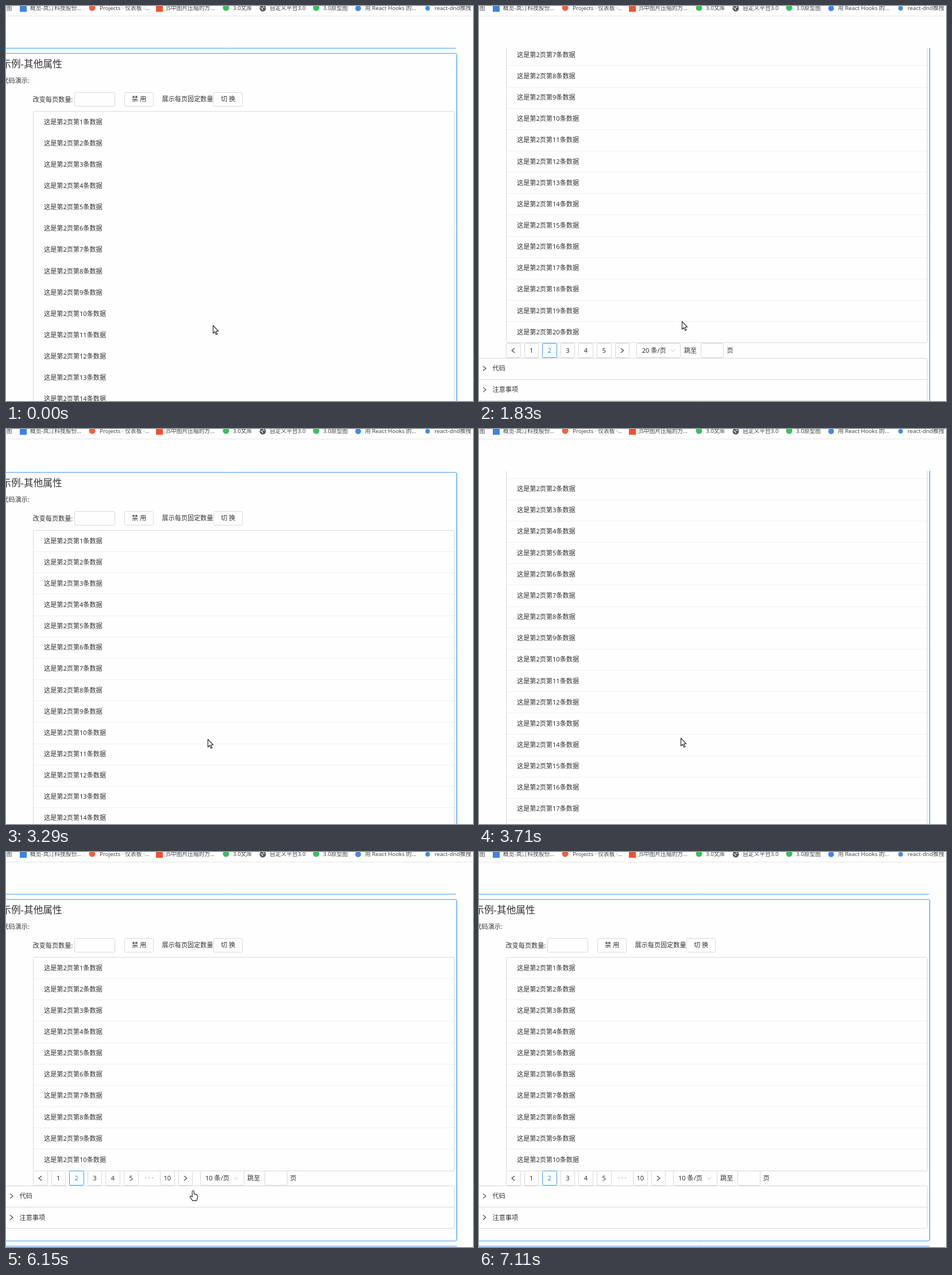
Animation of 813x688 px, one loop 7.85 s. Source, as an HTML page with a canvas:

```html
<!DOCTYPE html>
<html lang="zh-CN">
<head>
<meta charset="utf-8">
<title>分页示例</title>
<style>
html, body { margin: 0; width: 100%; height: 100%; overflow: hidden; background: #fefefe; }
canvas { display: block; width: 813px; height: 688px; }
</style>
</head>
<body>
<canvas id="stage" width="813" height="688"></canvas>
<script>
const W = 813, H = 688, LOOP = 7850;
const ROW = 37.15, TOP = 73;
const BLUE = '#409eff', INK = '#333', LINE = '#d9d9d9', RULE = '#efefef';
const FONT = '"Noto Sans", "Noto Sans CJK SC", "Noto Sans CJK", sans-serif';
const ctx = document.getElementById('stage').getContext('2d');

const ticks = [0, 120, 240, 360, 510, 660, 780, 930, 1050, 1170, 1290, 1410, 1710, 1830, 1950,
  2350, 2470, 2620, 2740, 2890, 3020, 3170, 3290, 3410, 3560, 3710, 3860, 3980, 4130, 4250,
  4400, 4520, 4640, 4760, 4910, 5060, 5190, 5340, 5460, 5610, 5750, 6030, 6150, 6300, 6450,
  6570, 6720, 6840, 6990, 7110];

// [time, scroll offset]
const scrollKeys = [[0, 0], [120, 45], [360, 185.8], [510, 185.8], [660, 197], [780, 227],
  [930, 262], [1410, 278.6], [1600, 278.6], [1950, 371.5], [2230, 371.5], [2470, 230],
  [2740, 121], [3020, 46], [3170, 14], [3410, 0], [3560, 46], [3710, 134.5], [3980, 225],
  [4250, 330], [4400, 371.5], [5749, 371.5], [5750, 0], [6150, 0], [6570, -92.9],
  [6720, -92.9], [7110, 0]];

// [time, x, y]
const cursorKeys = [[0, 360, 556], [360, 355, 550], [510, 353, 549], [2230, 353, 549],
  [2470, 351, 540], [3410, 351, 540], [3710, 351, 538], [4400, 351, 538], [4640, 330, 562],
  [4760, 323, 573], [4910, 323, 570], [5060, 323, 570], [5460, 320, 597], [5610, 320, 598],
  [5750, 320, 598], [6150, 319.5, 589]];

function sample(keys, t, col = 1) {
  let a = keys[0];
  for (const b of keys) {
    if (t < b[0]) return a[col] + (b[col] - a[col]) * (t - a[0]) / (b[0] - a[0]);
    a = b;
  }
  return a[col];
}

// Text is placed by its left (or middle) x and its visual centre y.
function text(s, x, y, { size = 11.14, color = INK, align = 'left', weight = 400 } = {}) {
  ctx.font = `${weight} ${size}px ${FONT}`;
  ctx.fillStyle = color;
  ctx.textAlign = align;
  ctx.fillText(s, x, Math.round(y + size * 0.36));
}

function rect(x, y, w, h, color) {
  ctx.fillStyle = color;
  ctx.fillRect(x, y, w, h);
}

function hline(x0, x1, y, color) {
  rect(x0, Math.round(y), x1 - x0, 1, color);
}

function frame(x0, y0, x1, y1, color = LINE, r = 2, fill) {
  const x = Math.round(x0) + 0.5, y = Math.round(y0) + 0.5;
  ctx.beginPath();
  ctx.roundRect(x, y, Math.round(x1) + 0.5 - x, Math.round(y1) + 0.5 - y, r);
  if (fill) { ctx.fillStyle = fill; ctx.fill(); }
  ctx.strokeStyle = color;
  ctx.lineWidth = 1;
  ctx.stroke();
}

function stroke(points, color, width) {
  ctx.beginPath();
  points.forEach(([x, y]) => ctx.lineTo(x, y));
  ctx.strokeStyle = color;
  ctx.lineWidth = width;
  ctx.stroke();
}

function chevron(x, y, dir) {
  stroke([[x - 2.5 * dir, y - 4], [x + 2.5 * dir, y], [x - 2.5 * dir, y + 4]], '#444', 1.2);
}

function dot(x, y, r, color) {
  ctx.beginPath();
  ctx.arc(x, y, r, 0, 7);
  ctx.fillStyle = color;
  ctx.fill();
}

function bookmarks() {
  const marks = [[-9, '结图'], [42, '概览-岚汀科技股份...'], [163, 'Projects · 仪表板 ·...'],
    [279, 'JS中图片压缩的方...'], [395, '3.0文库'], [459, '自定义平台3.0'], [552, '3.0原型图'],
    [625, '用 React Hooks 的...'], [746, 'react-dnd推拽']];
  for (const [x, s] of marks) text(s, x, 3.5, { size: 9.75, color: '#444' });
  rect(24, -2, 12, 12, '#3b82e8');
  dot(150, 3, 5.5, '#f0603a');
  rect(261, -2, 12, 12, '#f4502f');
  dot(383, 3, 5.5, '#35c35a');
  dot(447, 4, 5.5, '#55585c');
  stroke([[443, 3], [446, 4], [447, 7]], '#fff', 1.3);
  stroke([[447, 1], [450, 3]], '#fff', 1.3);
  dot(540, 3, 5.5, '#35c35a');
  dot(613, 4, 5, '#3f87f5');
  dot(734, 4, 4, '#3f8fe8');
  hline(0, W, 17, '#e6e6e6');
}

function card(y0, y1) {
  frame(-20, y0, 784, y1, BLUE, 2);
  ctx.globalAlpha = 0.3;
  rect(785, y0 + 2, 1, y1 - y0 - 4, BLUE);
  ctx.globalAlpha = 1;
}

function panels(y) {
  frame(-20, y, 780, y + 2 * ROW);
  hline(0, 780, y + ROW, LINE);
  ['代码', '注意事项'].forEach((s, i) => {
    const mid = y + 18.6 + i * ROW;
    chevron(9.5, mid, 1);
    text(s, 23.5, mid);
  });
}

function button(s, x, y) {
  frame(x, y, x + 50, y + 24);
  text(s, x + 25.5, y + 12, { align: 'center' });
}

function controls(o) {
  text('示例-其他属性', -7.8, 101 + o, { size: 16.7 });
  text('代码演示:', -6.6, 130 + o);
  text('改变每页数量:', 46.5, 162.5 + o);
  frame(119, 150 + o, 189, 174 + o);
  button('禁 用', 206, 150 + o);
  text('展示每页固定数量', 271.5, 162 + o);
  button('切 换', 361, 150 + o);
}

function list(o, count, rules) {
  const y = 183 + o;
  frame(47, y, 780, y + count * ROW);
  for (let i = 0; i < count; i++) {
    if (i && rules) hline(48, 780, y + i * ROW, RULE);
    text(`这是第2页第${i + 1}条数据`, 66, y + 18.5 + i * ROW);
  }
}

function pager(y, size, active) {
  const cells = size === 20 ? ['<', 1, 2, 3, 4, 5, '>'] : ['<', 1, 2, 3, 4, 5, '…', 10, '>'];
  const mid = y + 12.7;
  cells.forEach((c, i) => {
    const x = 47 + i * 31.6, cx = x + 12.6;
    if (c === '…') {
      for (const d of [-6, 0, 6]) dot(cx + d, mid, 1.1, '#bbb');
      return;
    }
    const on = c === 2;
    frame(x, y, x + 24.6, y + 25, on ? BLUE : LINE);
    if (c === '<' || c === '>') chevron(cx, mid + 0.5, c === '>' ? 1 : -1);
    else text(String(c), cx, mid, { align: 'center', color: on ? '#1890ff' : INK });
  });
  const x = 47 + cells.length * 31.6 + 6.2;
  frame(x, y, x + 76, y + 25, active ? BLUE : LINE);
  text(`${size} 条/页`, x + 9.3, mid);
  stroke([[x + 59.5, mid - 1.5], [x + 63, mid + 2.5], [x + 66.5, mid - 1.5]], '#c4c4c4', 1);
  text('跳至', x + 82.5, mid);
  frame(x + 112, y, x + 151, y + 25);
  text('页', x + 157, mid);
}

function dropdown(t) {
  const y = 585;
  ctx.save();
  ctx.globalAlpha = t < 5190 ? 0.6 : 1;
  ctx.shadowColor = 'rgba(0,0,0,.18)';
  ctx.shadowBlur = 7;
  ctx.shadowOffsetY = 2;
  rect(274, y, 77, 126, '#fff');
  ctx.shadowColor = 'transparent';
  [10, 20, 50, 100].forEach((n, i) => {
    const top = y + 3.7 + i * 29.7;
    if (n === 20) rect(274, top, 77, 29.7, '#e6f7ff');
    else if (n === 10 && t >= 5340) rect(274, top, 77, 29.7, '#f5f5f5');
    text(`${n} 条/页`, 284, top + 15, { weight: n === 20 ? 600 : 400 });
  });
  ctx.restore();
}

function cursor(t) {
  if (t >= 7110) return;
  const arrow = 'M.5 .5V14L3.6 11.1 5.8 16.2 7.9 15.3 5.7 10.3H9.8Z';
  const hand = 'M4.7 2Q6.3 -.6 7.8 2V7Q9.5 5.8 10.3 7.4 12 6.8 12.4 8.4 14 8.2 14 10V13L12.3 18.4H5.5L.8 12.2Q.4 9.6 3 10.4L4.7 12Z';
  const path = new Path2D(t >= 4640 ? hand : arrow);
  ctx.save();
  ctx.translate(sample(cursorKeys, t, 1), sample(cursorKeys, t, 2));
  ctx.fillStyle = '#fff';
  ctx.fill(path);
  ctx.strokeStyle = '#222';
  ctx.lineWidth = 1.1;
  ctx.lineJoin = 'round';
  ctx.stroke(path);
  ctx.restore();
}

function draw(t) {
  const size = t < 5750 ? 20 : 10;
  const o = -sample(scrollKeys, t);
  const end = 183 + o + size * ROW;
  rect(0, 0, W, H, '#fefefe');
  bookmarks();
  ctx.save();
  ctx.beginPath();
  ctx.rect(0, TOP, W, H - TOP);
  ctx.clip();
  card(o - 400, 73 + o);
  panels(o - 23);
  card(82 + o, end + 122.5);
  card(end + 131, end + 700);
  controls(o);
  list(o, size, t >= 120);
  pager(end + 0.5, size, t >= 4640 && t < 5750);
  panels(end + 26.3);
  if (t >= 5060 && t < 5750) dropdown(t);
  ctx.restore();
  cursor(t);
}

function tick(now) {
  const t = now % LOOP;
  draw(ticks.findLast(k => k <= t) || 0);
  requestAnimationFrame(tick);
}
draw(0);
requestAnimationFrame(tick);
</script>
</body>
</html>
```
